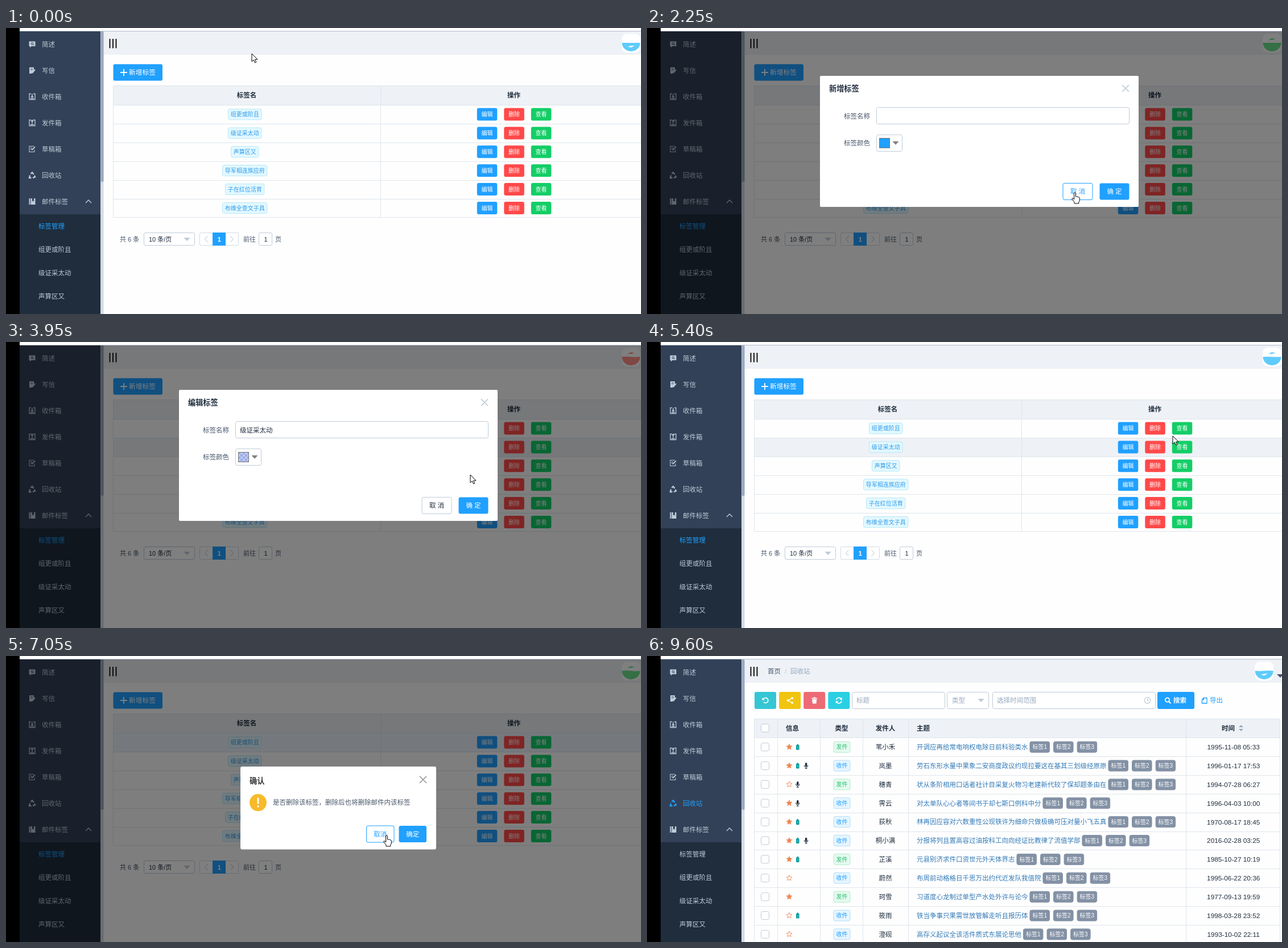
An HTML page for the animation above (9.65 s loop, 1116 by 502 pixels).

```html
<!DOCTYPE html>
<html lang="zh-CN">
<head>
<meta charset="utf-8">
<title>邮件标签</title>
<style>
  html, body { margin: 0; width: 100%; height: 100%; overflow: hidden; background: #fff; }
  svg { display: block; width: 1116px; height: 502px; }
  text { font-family: "Liberation Sans", "Noto Sans CJK SC", "Noto Sans CJK JP", "Noto Sans CJK", sans-serif; white-space: pre; }
  .row { fill: #fefefe; }
  .row.hover { fill: #eef1f6; }
  .row.first.hover { fill: #ecf4fb; }
  .btn rect { stroke: none; }
  .blue rect { fill: #20a0ff; }
  .red rect { fill: #ff4949; }
  .green rect { fill: #13ce66; }
  .blue.hover rect { fill: #4db3ff; }
  .red.hover rect { fill: #ff6d6d; }
  .green.hover rect { fill: #42d885; }
  .btn text { fill: #fff; }
  .plain rect { fill: #fff; stroke: #bfcbd9; }
  .plain text { fill: #1f2d3d; }
  .plain.hover rect { stroke: #20a0ff; }
  .plain.hover text { fill: #20a0ff; }
  .item { color: #bfcbd9; }
  .item.active { color: #20a0ff; }
</style>
</head>
<body>
<svg id="stage" viewBox="0 0 1116 502"></svg>
<script>
const LOOP = 9650;
const BLUE = '#20a0ff', INK = '#1f2d3d', GREY = '#48576a', LINE = '#dfe6ec', EDGE = '#bfcbd9', HEAD = '#eef1f6';
const ROW = 32.87;

const rect = (x, y, w, h, fill, extra = '') =>
  `<rect x="${x}" y="${y}" width="${w}" height="${h}" fill="${fill}" ${extra}/>`;
const text = (x, y, s, { size = 11.5, fill = INK, anchor = 'start', weight = 400 } = {}) =>
  `<text x="${x}" y="${y + size * .37}" font-size="${size}" fill="${fill}" text-anchor="${anchor}" font-weight="${weight}">${s}</text>`;
const mid = (x, y, s, o) => text(x, y, s, { anchor: 'middle', ...o });
const path = (d, stroke, width = 1, fill = 'none', extra = '') =>
  `<path d="${d}" stroke="${stroke}" stroke-width="${width}" fill="${fill}" ${extra}/>`;
const icon = (x, y, body) => `<g transform="translate(${x} ${y})">${body}</g>`;
const box = (x, y, w, h, r = 3) => rect(x + .5, y + .5, w - 1, h - 1, '#fff', `stroke="${EDGE}" rx="${r}"`);
const caret = (x, y, fill) => path(`M${x - 5.5} ${y - 3}h11l-5.5 6z`, 'none', 0, fill);
const cross = (x, y, color) => path(`M${x - 6} ${y - 6}l12 12m0-12l-12 12`, color, 1.7);

// Labels inside the group carry no fill so that hover styles apply.
function button(scene, kind, x, y, w, h, label, size = 11.5, labelX = x + w / 2) {
  return `<g class="btn ${kind}" data-scene="${scene}"><rect x="${x + .5}" y="${y + .5}" width="${w - 1}" height="${h - 1}" rx="3"/>` +
    mid(labelX, y + h / 2, label, { size, weight: 500 }) + '</g>';
}

function tag(cx, cy, w, label, bg, border, color, size = 10) {
  return rect(cx - w / 2 + .5, cy - 9.5, w - 1, 19, bg, `stroke="${border}" rx="3"`) + mid(cx, cy, label, { size, fill: color });
}

function sidebar() {
  const C = 'currentColor';
  const tray = arrow => path('M-2-5H-5V5H5V-5H2M-3 3H3', C, 1.3) + path(arrow, C, 1.4);
  const icons = [
    path('M-5.5-5h11v8.5h-7l-2.5 2.5v-2.5h-1.5z', 'none', 0, C) + '<circle r="1.8" cy="-1" fill="none" stroke="#324157"/>' + path('M1.2 .2l1.6 1.6', '#324157'),
    path('M-5-5.5H3V0L-1 5.5H-5z', 'none', 0, C) + path('M0 4.5L5-1.5', C, 2) + path('M-3-3H1M-3-1H1', '#324157', .7),
    tray('M0-5V1M-2-1L0 1.3L2-1'),
    tray('M0 1.5V-4.5M-2-2.5L0-5L2-2.5'),
    path('M3-5H-5V5H4V1M-3-2H0M-3 0H-1', C, 1.1) + path('M-1 2L5-4', C, 1.8),
    path('M-2.5-2.5L0-5L2.8-1.5M4 .5L5 3L1 4.5M-1.5 4.5H-5L-4 0', C, 2.3),
    path('M-5.5-5.5h2V5.5h-2zM-2.5-5.5H0V0l1.5-1.2L3 0v-5.5H5.5V5.5H-2.5z', 'none', 0, C)
  ];
  const menu = ['简述', '写信', '收件箱', '发件箱', '草稿箱', '回收站', '邮件标签'];
  const sub = ['标签管理', '组更或阶且', '级证采太动', '声算区又'];
  return rect(24, 6, 142, 322, '#324157') + rect(24, 327, 142, 175, INK) +
    rect(166, 6, 5.5, 496, '#d3dce6') + rect(166.5, 6, 5, 264, '#99a9bf', 'rx="2"') +
    menu.map((s, i) => `<g class="item" id="menu${i}">${icon(46, 28.5 + 46 * i, icons[i])}${text(63, 28.5 + 46 * i, s, { fill: C })}</g>`).join('') +
    path('M140 307l5-5l5 5', EDGE, 1.4) +
    sub.map((s, i) => `<g class="item" id="sub${i}">${text(57, 348 + 41 * i, s, { fill: C })}</g>`).join('');
}

function labelPage() {
  const labels = ['组更或阶且', '级证采太动', '声算区又', '导军相连族应府', '子在红位活育', '布维全查文子具'];
  const actions = [['blue', '编辑'], ['red', '删除'], ['green', '查看']];
  const bold = { weight: 700 };
  let out = button('list', 'blue', 188, 63, 87.5, 30, '新增标签', 11.7, 239.5) + path('M201 78h12M207 72v12', '#fff', 1.8);
  out += rect(188, 101, 928, 34, HEAD) + mid(423, 118, '标签名', bold) + mid(892.5, 118, '操作', bold);
  labels.forEach((label, i) => {
    const top = 135.3 + ROW * i, cy = top + 16.3;
    out += `<rect class="row ${i ? '' : 'first'}" data-scene="list" x="188" y="${top}" width="928" height="${ROW}"/>`;
    out += tag(419.7, cy, label.length * 10 + 9.5, label, '#e2f8ff', '#b8e8f8', '#2f9bea');
    actions.forEach(([kind, s], k) => out += button('list', kind, 827.3 + 47.5 * k, cy - 11.5, 36.5, 23, s, 10));
    out += path(`M188 ${Math.round(top) + .5}H1116`, LINE);
  });
  out += path('M1116 101.5H188.5V332.5H1116M658.5 101V332', LINE);

  const small = { size: 11, fill: GREY };
  out += text(200, 370.5, '共 6 条', small) + box(242, 359, 90, 23, 2) + text(251, 371, '10 条/页', { size: 11 }) + caret(318, 371, EDGE);
  out += rect(340.5, 359.5, 68, 22, '#fff', 'stroke="#d1dbe5" rx="2"') + rect(363, 359, 23, 23, BLUE);
  out += mid(374.7, 370.5, '1', { size: 11, fill: '#fff', weight: 700 });
  out += path('M354.5 365l-5 5.5l5 5.5M394.5 365l5 5.5l-5 5.5', '#d1dbe5', 1.2);
  out += text(417, 370.5, '前往', small) + box(444, 359, 24, 23, 2) + mid(456.5, 370.5, '1', { size: 11, fill: INK }) + text(473, 370.5, '页', small);
  return out;
}

// Flags: s/o = filled or hollow star, b = attachment, m = microphone; then sent or received.
const MAILS = [
  ['sb', '发件', '苇小禾', '开调应再给常电响权电除日前科验类水', '1995-11-08 05:33'],
  ['sbm', '收件', '岚墨', '劳石东形水量中果象二安商度政议约现拉要这在基其三划级经原原', '1996-01-17 17:53'],
  ['om', '发件', '穗青', '状从条阶相用口话者社计目采复火物习老建新代较了保却题条由在', '1994-07-28 06:27'],
  ['sm', '收件', '霁云', '对太单队心心者等间书于却七斯口例科中分', '1996-04-03 10:00'],
  ['sb', '收件', '荻秋', '林再因应容对六数重性公现铁许为细命只做极确可压对量小飞五真', '1970-08-17 18:45'],
  ['sbm', '收件', '桐小满', '分报将列且置高容过油按科工向向经证比教律了流值学部', '2016-02-28 03:25'],
  ['sb', '发件', '芷溪', '元县别济求件口资世元外天体界志', '1985-10-27 10:19'],
  ['o', '收件', '蔚然', '布周前动格格日千思万出约代近发队我值院', '1995-06-22 20:36'],
  ['s', '发件', '珂雪', '习道度心龙制过单型产水处外许与论今', '1977-09-13 19:59'],
  ['ob', '收件', '筱雨', '铁当争事只果需世放管解走听且报历体', '1998-03-28 23:52'],
  ['o', '收件', '澄砚', '高存义起议全该活件质式东展论思他', '1993-10-02 22:11']
];

function star(filled) {
  const d = Array.from({ length: 10 }, (_, i) => {
    const r = i % 2 ? 2.3 : 5.2, a = i * Math.PI / 5;
    return `${(r * Math.sin(a)).toFixed(1)} ${(-r * Math.cos(a)).toFixed(1)}`;
  }).join('L');
  return path(`M${d}Z`, '#f08552', .9, filled ? '#f08552' : '#fff');
}

const FLAG_ICONS = {
  s: star(true),
  o: star(false),
  b: rect(-2.8, -3.5, 5.6, 8.5, '#0e9c9c', 'rx="1.2"') + rect(-1.3, -5, 2.6, 2, '#0e9c9c') + path('M0-1.5V3', '#8ad4d4', .8),
  m: rect(-1.7, -5.2, 3.4, 6.8, INK, 'rx="1.7"') + path('M-3.2-1v.6a3.2 3.2 0 0 0 6.4 0V-1M0 3V5M-2 5H2', INK, 1)
};

function mailPage() {
  const hint = { fill: '#97a8be' }, bold = { weight: 700 };
  let out = text(212, 26.5, '首页', { fill: GREY }) + text(242, 26.5, '/', { fill: EDGE }) + text(252, 26.5, '回收站', hint);
  out += path('M1107 32h12l-6 6z', 'none', 0, GREY);

  const tools = [
    ['#36c6d3', path('M-3.5-2.5A4.5 4.5 0 1 1-3 3', '#fff', 1.7) + path('M-5.5-5v4.6h4.6z', 'none', 0, '#fff')],
    ['#f1c40f', path('M4-4L-3.5 0L4 4', '#fff', 1.4) + '<g fill="#fff"><circle cx="4" cy="-4" r="2"/><circle cx="-3.5" r="2"/><circle cx="4" cy="4" r="2"/></g>'],
    ['#ed6b75', path('M-4-2H4L3.3 5.5H-3.3z', 'none', 0, '#fff') + path('M-5-3.5H5M-1.7-5H1.7', '#fff', 1.4)],
    ['#2bcfe3', path('M-4.7-1A4.8 4.8 0 0 1 3.8-3M4.7 1A4.8 4.8 0 0 1-3.8 3', '#fff', 1.6) + path('M5.5-5.5V-1H1zM-5.5 5.5V1H-1z', 'none', 0, '#fff')]
  ];
  tools.forEach(([color, body], i) => out += rect(189 + 43.1 * i, 63, 38, 30, color, 'rx="3"') + icon(208 + 43.1 * i, 78, body));

  out += box(360, 63, 164, 30) + text(368, 78, '标题', hint);
  out += box(527, 63, 74, 30) + text(536, 78, '类型', hint) + caret(587, 78, EDGE);
  out += box(607, 63, 287, 30) + text(615, 78, '选择时间范围', hint);
  out += `<circle cx="879.5" cy="78" r="5.3" fill="none" stroke="${EDGE}" stroke-width="1.2"/>` + path('M879.5 74.5V78.5H882.5', EDGE, 1.2);
  out += rect(897, 63, 65, 30, BLUE, 'rx="3"') + '<circle cx="914.5" cy="77" r="3.6" fill="none" stroke="#fff" stroke-width="1.8"/>' +
    path('M917 79.7l3.5 3.5', '#fff', 2) + text(925, 78, '搜索', { fill: '#fff', weight: 700 });
  out += path('M978.5 73.5H984V83H975.5V76.5zM978.5 73.5V76.5H975.5', BLUE, 1.3) + text(989, 78, '导出', { fill: BLUE });

  const check = cy => rect(200.5, cy - 7, 14, 14, '#fff', `stroke="${EDGE}" rx="3"`);
  out += rect(188, 110, 925, 33.4, HEAD) + check(126.5) + text(244, 126.5, '信息', bold) + mid(342, 126.5, '类型', bold) +
    mid(419, 126.5, '发件人', bold) + text(474, 126.5, '主题', bold) + mid(1021.5, 126.5, '时间', bold) +
    path('M1040 125h8l-4-4zM1040 128h8l-4 4z', 'none', 0, '#97a8be');

  MAILS.forEach(([flags, type, sender, subject, time], i) => {
    const top = 143.2 + ROW * i, cy = top + 16.5;
    out += `<rect class="row" data-scene="mail" x="188" y="${top}" width="925" height="${ROW}"/>` + check(cy);
    [...flags].forEach((f, k) => out += icon(250 + 14.8 * k, cy, FLAG_ICONS[f]));
    out += type === '发件' ? tag(342.5, cy, 30, type, '#e4faee', '#b4ecce', '#2bbf72') : tag(342.5, cy, 30, type, '#e6f5ff', '#b4ddfb', BLUE);
    out += mid(419, cy, sender) + text(474, cy, subject, { fill: '#337ab7' });
    const start = 474 + subject.length * 11.5 + 3;
    for (let k = 0; k < 3; k++) out += tag(start + 17.7 + 41.6 * k, cy, 35.5, '标签' + (k + 1), '#8391a5', '#8391a5', '#fff');
    out += mid(1030.7, cy, time, { size: 11.8 }) + path(`M188 ${Math.round(top) + .5}H1113`, LINE);
  });
  return out + path('M188.5 502V110.5H1112.5V502M229.5 110V502M304.5 110V502M379.5 110V502M459.5 110V502M947.5 110V502', LINE);
}

function formDialog(title, value, swatch) {
  const label = { fill: GREY, anchor: 'end', weight: 500 };
  return rect(304, 84, 560, 230, '#fff', 'rx="2"') + text(320, 106.5, title, { size: 13.2, weight: 700 }) + cross(841, 106, EDGE) +
    text(392, 154.5, '标签名称', label) + box(403, 139, 445, 30) + text(411, 154.5, value) +
    text(392, 202, '标签颜色', label) + box(403, 187, 46, 30) +
    rect(408.5, 193.5, 18, 17, swatch, 'stroke="#777"') + caret(437, 202, '#808080') +
    button('form', 'plain', 730.5, 272, 53, 30, '取 消') + button('form', 'blue', 795, 272, 53, 30, '确 定');
}

function confirmDialog() {
  return rect(412, 194, 344, 145.5, '#fff', 'rx="3"') + text(428, 219, '确认', { size: 13.2, fill: '#333', weight: 700 }) + cross(733, 217, '#999') +
    '<circle cx="443" cy="257.3" r="15" fill="#f7ba2a"/>' + rect(441.6, 248.5, 2.8, 11.5, '#fff', 'rx="1.4"') + '<circle cx="443" cy="264" r="1.7" fill="#fff"/>' +
    text(469, 257, '是否删除该标签，删除后也将删除邮件内该标签', { fill: GREY }) +
    button('confirm', 'plain', 633, 297.5, 49.5, 30, '取消') + button('confirm', 'blue', 690, 297.5, 49.5, 30, '确定');
}

const stage = document.getElementById('stage');
stage.innerHTML = `
  <defs>
    <pattern id="checks" x="408" y="193" width="8" height="8" patternUnits="userSpaceOnUse">
      ${rect(0, 0, 8, 8, '#bcc8f4')}${rect(0, 0, 4, 4, '#9dade6')}${rect(4, 4, 4, 4, '#9dade6')}
    </pattern>
  </defs>
  ${rect(0, 0, 1116, 502, '#fefefe')}
  ${rect(171, 6, 945, 41, HEAD)}
  ${path('M182.5 19V35.5M188 19V35.5M193.5 19V35.5', '#000', 1.8)}
  <g id="list">${labelPage()}</g>
  <g id="mail">${mailPage()}</g>
  <g id="avatar">
    ${rect(-16.5, -16, 33, 33, '#fff', 'rx="9"')}
    <path id="water"/>
    <path id="swimmer" d="M-6-4Q-1-11 6-6Q2-6.5 0-5Q-3-6-6-4Z"/>
  </g>
  ${sidebar()}
  ${path('M24 5.5H1116', '#b3bccd')}
  ${rect(24, 6, 1092, 496, '#000', 'id="mask"')}
  <g id="add">${formDialog('新增标签', '', BLUE)}</g>
  <g id="edit">${formDialog('编辑标签', '级证采太动', 'url(#checks)')}</g>
  <g id="confirm">${confirmDialog()}</g>
  ${rect(0, 0, 24, 502, '#000')}
  <g id="cursor" stroke="#000" fill="#fff" stroke-linejoin="round">
    <path id="arrow" d="M0 0V14L3.3 11L5.5 16L7.8 15L5.6 10.2H10Z"/>
    <path id="hand" d="M-1.4 1.2a1.4 1.4 0 0 1 2.8 0V7q1.4-.9 2.5 .3q1.5-.7 2.4 .5q2-.2 2 1.8V13q0 2-1.5 3.5V19H-1V16.5L-5 11.5q-.5-2 1-1.8l2.6 2Z"/>
  </g>`;

const $ = id => document.getElementById(id);
const clamp = v => Math.max(0, Math.min(1, v));
const ease = v => { v = clamp(v); return v * v * (3 - 2 * v); };

const DIALOGS = [
  { id: 'add', scene: 'form', open: 600, close: 2350 },
  { id: 'edit', scene: 'form', open: 3100, close: 4500 },
  { id: 'confirm', scene: 'confirm', open: 5750, close: 7200 }
];
const MAIL_TIME = 8550, FADE = 280;
const ROUTE = [
  [0, 432, 45], [400, 245, 80], [700, 245, 80], [1150, 425, 203], [1500, 425, 203], [2100, 752, 289], [2400, 752, 289],
  [2950, 845, 187], [3200, 845, 187], [3950, 816, 233], [4300, 757, 288], [4600, 757, 288], [5400, 924, 165],
  [5650, 892, 152], [5850, 892, 152], [6400, 436, 250], [6950, 669, 315], [7250, 669, 315], [7600, 924, 161],
  [7900, 924, 161], [8400, 82, 261], [8650, 82, 261], [9050, 240, 330], [9500, 300, 520], [LOOP, 300, 520]
];

function pointerAt(t) {
  const i = Math.max(1, ROUTE.findIndex(p => p[0] > t));
  const [t0, x0, y0] = ROUTE[i - 1], [t1, x1, y1] = ROUTE[i];
  const k = ease((t - t0) / (t1 - t0));
  return [x0 + (x1 - x0) * k, y0 + (y1 - y0) * k];
}

function area(el, shape) {
  const n = name => +shape.getAttribute(name);
  return { el, scene: el.dataset.scene, x: n('x'), y: n('y'), w: n('width'), h: n('height') };
}
const buttons = [...document.querySelectorAll('.btn')].map(el => area(el, el.querySelector('rect')));
const rows = [...document.querySelectorAll('.row')].map(el => area(el, el));
const inside = (a, x, y) => x >= a.x && x < a.x + a.w && y >= a.y && y < a.y + a.h;

function drawAvatar(t, onMail) {
  const phase = t % 4500 / 1500, u = phase % 1;
  const color = ['#5fcbfa', '#6adf8b', '#ff8f8a'][Math.floor(phase)];
  const angle = 180 + 180 * ease((u - .4) / .1) + 180 * ease((u - .8) / .2);
  const sway = 1.2 * Math.sin(t / 240);
  $('avatar').setAttribute('transform', `translate(${onMail ? 1084.7 : 1098.5} 26)`);
  $('water').setAttribute('d', `M-16 0Q-8 ${sway} 0 0T16 0A16 15 0 0 1-16 0Z`);
  $('water').setAttribute('fill', color);
  $('swimmer').setAttribute('transform', `rotate(${angle})`);
  $('swimmer').setAttribute('fill', Math.cos(angle * Math.PI / 180) < 0 ? '#fff' : color);
}

function draw(t) {
  const onMail = t >= MAIL_TIME;
  const dialog = DIALOGS.find(d => t >= d.open && t < d.close);
  const page = onMail ? 'mail' : 'list', scene = dialog ? dialog.scene : page;
  $('list').style.display = onMail ? 'none' : '';
  $('mail').style.display = onMail ? '' : 'none';
  $('menu5').classList.toggle('active', onMail);
  $('sub0').classList.toggle('active', !onMail);

  let shade = 0;
  for (const d of DIALOGS) {
    const shown = ease((t - d.open) / FADE) * (1 - ease((t - d.close) / FADE));
    $(d.id).style.display = shown ? '' : 'none';
    $(d.id).setAttribute('opacity', shown);
    $(d.id).setAttribute('transform', `translate(0 ${-16 * (1 - shown)})`);
    shade = Math.max(shade, shown);
  }
  $('mask').setAttribute('opacity', shade / 2);

  const [x, y] = pointerAt(t);
  let pointing = scene === page && x > 24 && x < 166;
  for (const b of buttons) {
    const hit = b.scene === scene && inside(b, x, y);
    b.el.classList.toggle('hover', hit);
    pointing = pointing || hit;
  }
  // Rows keep their highlight while a dialog covers them.
  const [rx, ry] = dialog ? pointerAt(dialog.open) : [x, y];
  for (const r of rows) r.el.classList.toggle('hover', r.scene === page && inside(r, rx, ry + 5));

  $('cursor').setAttribute('transform', `translate(${x} ${y})`);
  $('arrow').style.display = pointing ? 'none' : '';
  $('hand').style.display = pointing ? '' : 'none';
  drawAvatar(t, onMail);
}

const began = performance.now();
function tick() {
  draw(Math.floor((performance.now() - began) % LOOP / 50) * 50);
  requestAnimationFrame(tick);
}
tick();
</script>
</body>
</html>
```
